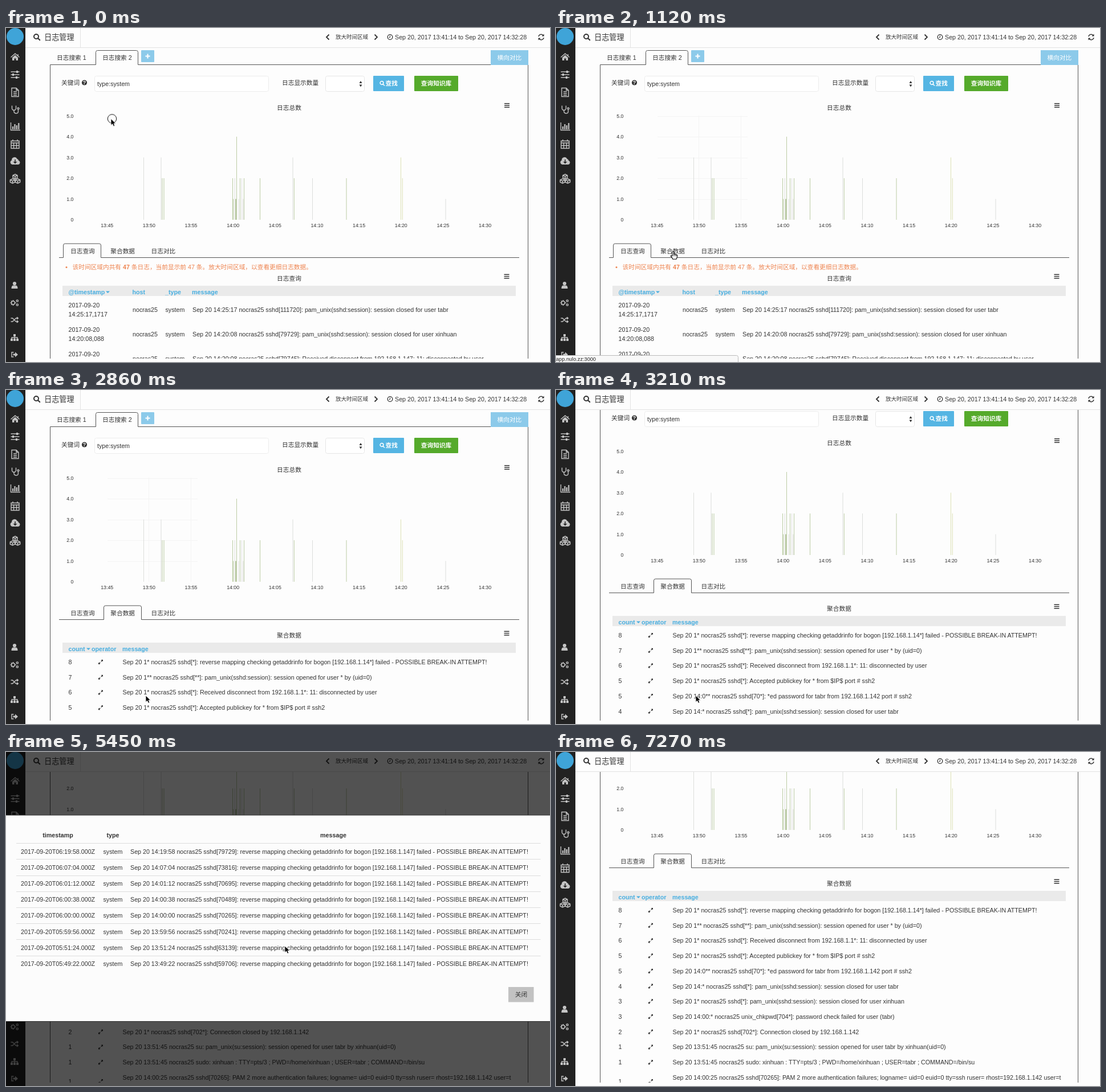
Write an HTML page that moves like this. It is 954 px wide and 587 px high and loops after 8.02 s.

```html
<!DOCTYPE html>
<html lang="zh">
<head>
<meta charset="utf-8">
<title>日志管理</title>
<style>
html, body { margin: 0; width: 100%; height: 100%; overflow: hidden; background: #fdfdfd; }
svg { display: block; width: 954px; height: 587px; }
text { font: 10.7px "Liberation Sans", "Noto Sans CJK SC", "Noto Sans CJK", sans-serif; fill: #333; white-space: pre; }
path { fill: none; }
.mid { text-anchor: middle; }
.end { text-anchor: end; }
.bold { font-weight: bold; }
.axis { font-size: 8.8px; }
.small { font-size: 9.5px; }
.title { font-size: 13.2px; }
.url { font-size: 9.2px; fill: #222; }
.head { font-weight: bold; fill: #47aee0; }
.white { fill: #fff; }
.note { fill: #ee8450; }
.line { stroke: #555; }
.ink { stroke: #333; stroke-width: 1.5; }
.solid { fill: #333; }
.side .s { stroke: #c4c4c4; stroke-width: 1.4; }
.side .f { fill: #c4c4c4; }
</style>
</head>
<body>
<svg id="stage" viewBox="0 0 954 587"></svg>
<script>
const LOOP = 8020;
const HOST = 'nocras25', USER = 'xinhuan', ADMIN = 'tabr';

const text = (x, y, s, cls = '') => `<text x="${x}" y="${y}" class="${cls}">${s}</text>`;
const rect = (x, y, w, h, fill, more = '') => `<rect x="${x}" y="${y}" width="${w}" height="${h}" fill="${fill}" ${more}/>`;
const path = (d, cls, more = '') => `<path d="${d}" class="${cls}" ${more}/>`;
const group = (id, body, more = '') => `<g id="${id}" ${more}>${body}</g>`;
const at = (x, y, body) => `<g transform="translate(${x} ${y})">${body}</g>`;
const list = (n, fn) => Array.from({ length: n }, (_, i) => fn(i)).join('');

const menu = (x, y) => path(`M${x - 4.5} ${y - 3.3}h9m-9 3.3h9m-9 3.3h9`, 'ink');
const caret = (x, y) => path(`M${x - 3.5} ${y - 1.5}h7l-3.5 3.5z`, '', 'style="fill:#47aee0"');
const lens = (x, y, r, color, w) =>
  path(`M${x - r} ${y}a${r} ${r} 0 1 0 ${2 * r} 0a${r} ${r} 0 1 0 ${-2 * r} 0M${x + r * .7} ${y + r * .7}l${r} ${r}`, '', `stroke="${color}" stroke-width="${w}"`);
const expand = (x, y) => at(x, y,
  path('M.8-.8L3-3M-.8.8L-3 3', 'ink') + path('M.8-4H4V-.8zM-.8 4H-4V.8z', 'solid'));
const tabBox = x => path(`M93 403.5H${x}V382q0-3 3-3h60q3 0 3 3V403.5H900`, 'line');

// Sidebar icons: x, y, filled path, stroked path
const icons = [
  [16, 51, 'M-5 1L0-3.5 5 1V6H1.5V2.5H-1.5V6H-5z', 'M-7.5.5L0-6 7.5.5M5-5V-2'],
  [16, 82, 'M2-7h3v4h-3zM-5-2h3v4h-3zM1 3h3v4h-3z', 'M-7.5-5H7.5M-7.5 0H7.5M-7.5 5H7.5'],
  [16, 113, '', 'M-6-7.5H2L6-3.5V7.5H-6zM2-7.5V-3.5H6M-3-1H3M-3 2H3M-3 5H3'],
  [16, 143, '', 'M-5.5-6.5V-2a3.5 3.5 0 0 0 7 0V-6.5M-2 1.5V4a3.7 3 0 0 0 7.4 0V0M4-1.5a1.5 1.5 0 1 0 3 0a1.5 1.5 0 1 0-3 0'],
  [16, 173, 'M-5 0h2.2v5h-2.2zM-1.6-4h2.2v9h-2.2zM1.8-2h2.2v7h-2.2zM5.2-6h2.2v11h-2.2z', 'M-7.5-7V6.5H9'],
  [16, 204, '', 'M-7-5.5H7V7.5H-7zM-7-2H7M-7 2.5H7M-2.5-2V7M2.5-2V7M-4-8V-4.5M4-8V-4.5'],
  [16, 234, 'M-5 6a4 4 0 0 1-1-7.6A5 5 0 0 1 3.5-4A3.5 3.5 0 0 1 6-1a3.6 3.6 0 0 1-1 7z', ''],
  [16, 265, '', 'M0-8L4-6V-2L0 0-4-2V-6zM-4-6L0-4.3 4-6M0-4V0M-4.5 0L-.3 2V6L-4.5 8-8.7 6V2zM-8.7 2L-4.5 4-.3 2M-4.5 4V8M4.5 0L8.7 2V6L4.5 8 .3 6V2zM.3 2L4.5 4 8.7 2M4.5 4V8'],
  [15, 452, 'M0-6a3 3 0 1 1 0 6.2a3 3 0 0 1 0-6.2zM-5.5 6q0-5.500 3-5.500h5q3 0 3 5.500z', ''],
  [15, 483, '', 'M-5.500 0a3 3 0 1 0 6 0a3 3 0 1 0-6 0M-2.500-5V-3M-2.500 3V5M-7.500 0H-5.500M.5 0H2.500M-6-3.500L-5-2.500M-6 3.500L-5 2.500M3.200-3.500a1.600 1.600 0 1 0 3.200 0a1.600 1.600 0 1 0-3.200 0M3.200 3.500a1.600 1.600 0 1 0 3.200 0a1.600 1.600 0 1 0-3.200 0'],
  [15, 513, '', 'M-6.5-3H-3.5L2.5 3H5.5M-6.5 3H-3.5L2.5-3H5.5M4-5L6.300-3 4-1M4 1L6.300 3 4 5'],
  [15, 544, 'M-2-6h4v4h-4zM-7 2h4v4h-4zM-2 2h4v4h-4zM3 2h4v4h-4z', 'M0-3V3M-5 3V0H5V3'],
  [15, 574, 'M-2.5-1.6H1V-4.5L6 0 1 4.5V1.6H-2.5z', 'M-1.500-4H-5V4H-1.500']
];

const sidebar = rect(0, 0, 34, 587, '#222') + '<circle cx="16" cy="15" r="15" fill="#3fa4d8"/>' +
  `<g class="side">${icons.map(([x, y, f, s]) => at(x, y, path(f, 'f') + path(s, 's'))).join('')}</g>` +
  path('M16 231V237M13.500 235L16 237.500 18.500 235', '', 'stroke="#222" stroke-width="1.500"');

const header = rect(34, 0, 920, 35, '#fdfdfd') +
  path('M34 34.5H954M130.5 0V35', '', 'stroke="#e2e2e2"') +
  lens(53, 15, 4, '#333', 2) + text(67, 20.5, '日志管理', 'title') +
  path('M566.500 11.500L562 16 566.500 20.500M646.500 11.500L651 16 646.500 20.500', 'ink', 'style="stroke-width:1.800"') +
  text(578, 19.2, '放大时间区域', 'small') +
  '<circle cx="673.500" cy="16" r="4.300" fill="none" stroke="#333" stroke-width="1.300"/>' + path('M673.500 13.500V16.500H671.500', 'ink', 'style="stroke-width:1"') +
  text(682, 20, 'Sep 20, 2017 13:41:14 to Sep 20, 2017 14:32:28') +
  path('M934 15a4.500 4.500 0 0 1 8-2M943 17a4.500 4.500 0 0 1-8 2', 'ink') +
  path('M943.500 10.500V14.500H939.500zM933.500 21.500V17.500H937.500z', 'solid');

const form =
  path('M157.5 64.5H77.5V900M157.5 64.5V42.5q0-3 3-3H228.5q3 0 3 3V64.5H915.5V900', 'line') +
  text(89, 55.5, '日志搜索 1') + text(169, 55.5, '日志搜索 2') +
  rect(237, 39, 23, 21, '#8ccaea', 'rx="1"') + path('M244.500 49.500h8m-4-4v8', '', 'stroke="#fff" stroke-width="2"') +
  rect(850, 39, 66, 26, '#8ccaea') + text(861.5, 56, '横向对比', 'white') +
  text(97, 99.5, '关键词') + '<circle cx="137.500" cy="96" r="4.600" fill="#333"/>' + text(137.5, 99, '?', 'white bold mid small') +
  rect(155.5, 84.5, 305, 27, '#fff', 'rx="3" stroke="#ececec"') + text(160, 102, 'type:system') +
  text(484, 99.5, '日志显示数量') + rect(560.5, 84.5, 68, 27, '#fff', 'rx="3" stroke="#e6e6e6"') +
  path('M619.500 97L622 93 624.500 97zM619.500 99.500L622 103.500 624.500 99.500z', 'solid') +
  rect(644, 84, 54, 27, '#55b5e3', 'rx="1"') + lens(659, 96.5, 2.9, '#fff', 1.5) + text(665.5, 101, '查找', 'white bold') +
  rect(716, 84, 77, 27, '#55aa2b', 'rx="1"') + text(727.8, 101, '查询知识库', 'white bold');

const bars = [
  [241.5, 3], [272, 3], [274, 2, 1], [277, 2, 1], [397.5, 2, 1], [398.7, 1, 1], [401.3, 2], [402.5, 1, 1],
  [403.5, 1, 1], [404.5, 4, 1], [408, 1], [410.5, 2, 1], [413.5, 2], [416, 1], [417.5, 2, 1], [445.5, 2, 1],
  [503, 3], [505.3, 2, 1], [537.5, 2], [597, 2, 1], [692.5, 3, 2], [695.3, 2, 2], [771, 1]
];
const tints = ['#dcdedb', '#bccca6', '#dde0b4'];
const axisY = v => 337 - v * 36.5;
const chart = text(496.5, 143.5, '日志总数', 'mid') + menu(878.5, 136) +
  list(6, v => text(118.5, axisY(v) + 3.2, v ? v + '.0' : '0', 'axis end')) +
  list(10, i => {
    const m = 45 + 5 * i;
    return text(177.2 + 73.65 * i, 350.3, `${13 + Math.floor(m / 60)}:${String(m % 60).padStart(2, '0')}`, 'axis mid');
  }) +
  group('grid', path(list(5, i => `M178 ${Math.round(axisY(i + 1)) + .5}H336`) + 'M250.500 154V337M324.500 154V337', '', 'stroke="#f4f4f4"')) +
  bars.map(([x, v, c = 0]) => rect(x - .5, axisY(v), 1, v * 36.5, tints[c])).join('') +
  text(113, 395.5, '日志查询') + text(183.3, 395.5, '聚合数据') + text(254.5, 395.5, '日志对比');

const records = [
  ['14:25:17,1717', `14:25:17 ${HOST} sshd[111720]: pam_unix(sshd:session): session closed for user ${ADMIN}`],
  ['14:20:08,088', `14:20:08 ${HOST} sshd[79729]: pam_unix(sshd:session): session closed for user ${USER}`],
  ['14:20:08,087', `14:20:08 ${HOST} sshd[79745]: Received disconnect from 192.168.1.147: 11: disconnected by user`]
];
const logs = group('logs', tabBox(100.5) +
  '<circle cx="106" cy="420.500" r="1.500" fill="#ee8450"/>' +
  text(116.5, 424, '该时间区域内共有 <tspan class="bold">47</tspan> 条日志，当前显示前 47 条。放大时间区域，以查看更细日志数据。', 'note') +
  text(496.5, 444, '日志查询', 'mid') + menu(878, 436.5) + rect(99, 453, 795, 18, '#eaeaea') +
  text(109.5, 468, '@timestamp', 'head') + caret(178.5, 464) + text(221.5, 468, 'host', 'head') +
  text(279, 468, '_type', 'head') + text(326, 468, 'message', 'head') +
  records.map(([time, msg], i) => at(0, 43 * i,
    text(109.5, 491, '2017-09-20') + text(109.5, 507, time) + text(222, 498.5, HOST) +
    text(279.5, 498.5, 'system') + text(327, 498.5, 'Sep 20 ' + msg))).join(''));

const patterns = [
  [8, `1* ${HOST} sshd[*]: reverse mapping checking getaddrinfo for bogon [192.168.1.14*] failed - POSSIBLE BREAK-IN ATTEMPT!`],
  [7, `1** ${HOST} sshd[**]: pam_unix(sshd:session): session opened for user * by (uid=0)`],
  [6, `1* ${HOST} sshd[*]: Received disconnect from 192.168.1.1*: 11: disconnected by user`],
  [5, `1* ${HOST} sshd[*]: Accepted publickey for * from $IP$ port # ssh2`],
  [5, `14:0** ${HOST} sshd[70*]: *ed password for ${ADMIN} from 192.168.1.142 port # ssh2`],
  [4, `14:* ${HOST} sshd[*]: pam_unix(sshd:session): session closed for user ${ADMIN}`],
  [3, `1* ${HOST} sshd[*]: pam_unix(sshd:session): session closed for user ${USER}`],
  [3, `14:00:* ${HOST} unix_chkpwd[704*]: password check failed for user (${ADMIN})`],
  [2, `1* ${HOST} sshd[702*]: Connection closed by 192.168.1.142`],
  [1, `13:51:45 ${HOST} su: pam_unix(su:session): session opened for user ${ADMIN} by ${USER}(uid=0)`],
  [1, `13:51:45 ${HOST} sudo: ${USER} : TTY=pts/3 ; PWD=/home/${USER} ; USER=${ADMIN} ; COMMAND=/bin/su`],
  [1, `14:00:25 ${HOST} sshd[70265]: PAM 2 more authentication failures; logname= uid=0 euid=0 tty=ssh ruser= rhost=192.168.1.142 user=${ADMIN[0]}`]
];
const summary = group('summary', tabBox(171.5) +
  text(496.5, 435, '聚合数据', 'mid') + menu(878, 427.5) + rect(99, 444, 795, 18, '#eaeaea') +
  text(109.5, 459, 'count', 'head') + caret(144.5, 455) + text(150, 459, 'operator', 'head') + text(204, 459, 'message', 'head') +
  patterns.map(([n, msg], i) => {
    const y = 482 + 26.72 * i, drop = i === 11 ? 7 : 0;
    return text(109.5, y + drop, n) + expand(166, y - 4 + drop) + text(204.5, y, 'Sep 20 ' + msg);
  }).join(''));

const status = group('status', path('M-1 587V575.5H316.500q3 0 3 3V587', '', 'style="fill:#f8f8f8" stroke="#bbb"') +
  text(0, 584.7, 'app.nulo.zz:3000', 'url'));

// UTC stamp, process id, last part of the address
const attempts = [
  ['06:19:58', 79729, 147], ['06:07:04', 73816, 147], ['06:01:12', 70695, 142], ['06:00:38', 70489, 142],
  ['06:00:00', 70265, 142], ['05:59:56', 70241, 142], ['05:51:24', 63139, 147], ['05:49:22', 59706, 147]
];
const modal = group('modal', rect(0, 0, 954, 587, '#000', 'opacity=".68"') +
  rect(0, 110.5, 954, 363.5, '#333') + rect(0, 111.5, 954, 361.5, '#fcfcfc') +
  text(91, 150, 'timestamp', 'bold mid') + text(187.5, 150, 'type', 'bold mid') + text(574, 150, 'message', 'bold mid') +
  attempts.map(([utc, pid, ip], i) => {
    const y = 178.6 + 28.2 * i, local = +utc.slice(0, 2) + 8 + utc.slice(2);
    return path(`M18 ${Math.round(y - 18.5) + .5}H937.500`, '', 'stroke="#ddd"') +
      text(26, y, `2017-09-20T${utc}.000Z`) + text(170.5, y, 'system') +
      text(218, y, `Sep 20 ${local} ${HOST} sshd[${pid}]: reverse mapping checking getaddrinfo for bogon [192.168.1.${ip}] failed - POSSIBLE BREAK-IN ATTEMPT!`);
  }).join('') +
  rect(881, 413, 44.5, 26.5, '#c2c2c2') + text(892.7, 430, '关闭'));

const cursor = group('cursor',
  '<circle id="ring" cx="2" cy="0" r="7.700" fill="#fff" fill-opacity=".3" stroke="#111"/>' +
  group('arrow', path('M0 0V11.500L2.700 9 4.600 13.200 6.800 12.200 5 8.200H8.500z', '', 'style="fill:#000" stroke="#fff" stroke-width=".8"')) +
  group('hand', path('M-1 1.200q0-1.700 1.300-1.700T1.600 1.200V4.500q1.400-.8 2.200.4 1.500-.6 2.100.6 1.800-.2 1.800 1.400 0 3-1.700 6.300H-.2Q-1.500 10-3.700 8 -4.200 6.300-1 7.600z', '', 'style="fill:#fff" stroke="#000" stroke-width="1.100"') +
    path('M1.600 5V8M3.800 5.500V8M5.900 6V8', '', 'stroke="#000" stroke-width=".8"')));

document.getElementById('stage').innerHTML =
  '<clipPath id="view"><rect x="34" y="35" width="920" height="546"/></clipPath>' +
  rect(0, 0, 954, 587, '#fdfdfd') +
  `<g clip-path="url(#view)">${group('page', form + chart + logs + summary)}</g>` +
  header + sidebar + status + modal + cursor;

// Timelines: [ms, declaration] pairs become stepped CSS keyframes
let css = '';
function timeline(id, steps) {
  const keys = [...steps, [LOOP, steps[steps.length - 1][1]]];
  css += `@keyframes ${id}{${keys.map(([ms, rule]) => `${(ms / LOOP * 100).toFixed(4)}%{${rule}}`).join('')}}` +
    `#${id}{animation:${id} ${LOOP}ms step-end infinite}`;
}
const shift = (x, y) => `transform:translate(${x.toFixed(1)}px,${y.toFixed(1)}px)`;
function shown(id, ...spans) {
  const steps = spans.flatMap(([a, b]) => [[a, 'opacity:1'], [b, 'opacity:0']]);
  if (steps[0][0] > 0) steps.unshift([0, 'opacity:0']);
  timeline(id, steps.filter(([ms]) => ms < LOOP));
}
// Even steps along a polyline; the spacing of its points sets the pace
const move = (start, end, n, pts) => Array.from({ length: n }, (_, i) => {
  const u = (i + 1) / n * (pts.length - 1), k = Math.min(Math.floor(u + 1e-9), pts.length - 2);
  const mix = axis => pts[k][axis] + (pts[k + 1][axis] - pts[k][axis]) * (u - k);
  return [start + (end - start) * i / (n - 1), shift(mix(0), mix(1))];
});

timeline('page', [[0, shift(0, 0)], [3160, shift(0, -20)], [3210, shift(0, -47)], [3510, shift(0, -200)]]);
timeline('cursor', [
  [0, shift(184, 159.5)],
  ...move(420, 1120, 13, [[184, 160], [192, 170], [235, 215], [295, 275], [324, 325], [296, 366], [245, 387], [214, 393], [205, 393]]),
  ...move(2130, 2860, 13, [[205, 393], [212, 402], [260, 430], [325, 465], [354, 500], [320, 526], [270, 538], [249, 539], [245, 537]]),
  [3840, shift(230, 503)],
  ...move(4020, 4360, 7, [[230, 503], [224, 480], [205, 410], [185, 340], [172, 290], [168, 277.5]]),
  [5120, shift(217, 228)],
  ...move(5330, 5690, 7, [[217, 228], [270, 181], [400, 255], [489, 341], [528, 382], [480, 372], [400, 350], [338, 333]]),
  ...move(5930, 6560, 12, [[338, 333], [360, 336], [450, 350], [600, 375], [760, 402], [870, 420], [903, 425], [910, 426]]),
  [7090, shift(910, 466)],
  [7270, shift(-60, -60)]
]);
shown('ring', [0, 60], [1560, 1620], [4650, 4710], [6860, 6920]);
shown('arrow', [0, 1000], [2180, 4300], [4710, 7270]);
shown('hand', [1000, 2180], [4300, 4710]);
shown('status', [1000, 2300]);
shown('grid', [600, 3160]);
shown('logs', [0, 1620]);
shown('summary', [1620, LOOP]);
shown('modal', [4710, 6920]);

const sheet = document.createElement('style');
sheet.textContent = css;
document.head.append(sheet);
</script>
</body>
</html>
```
